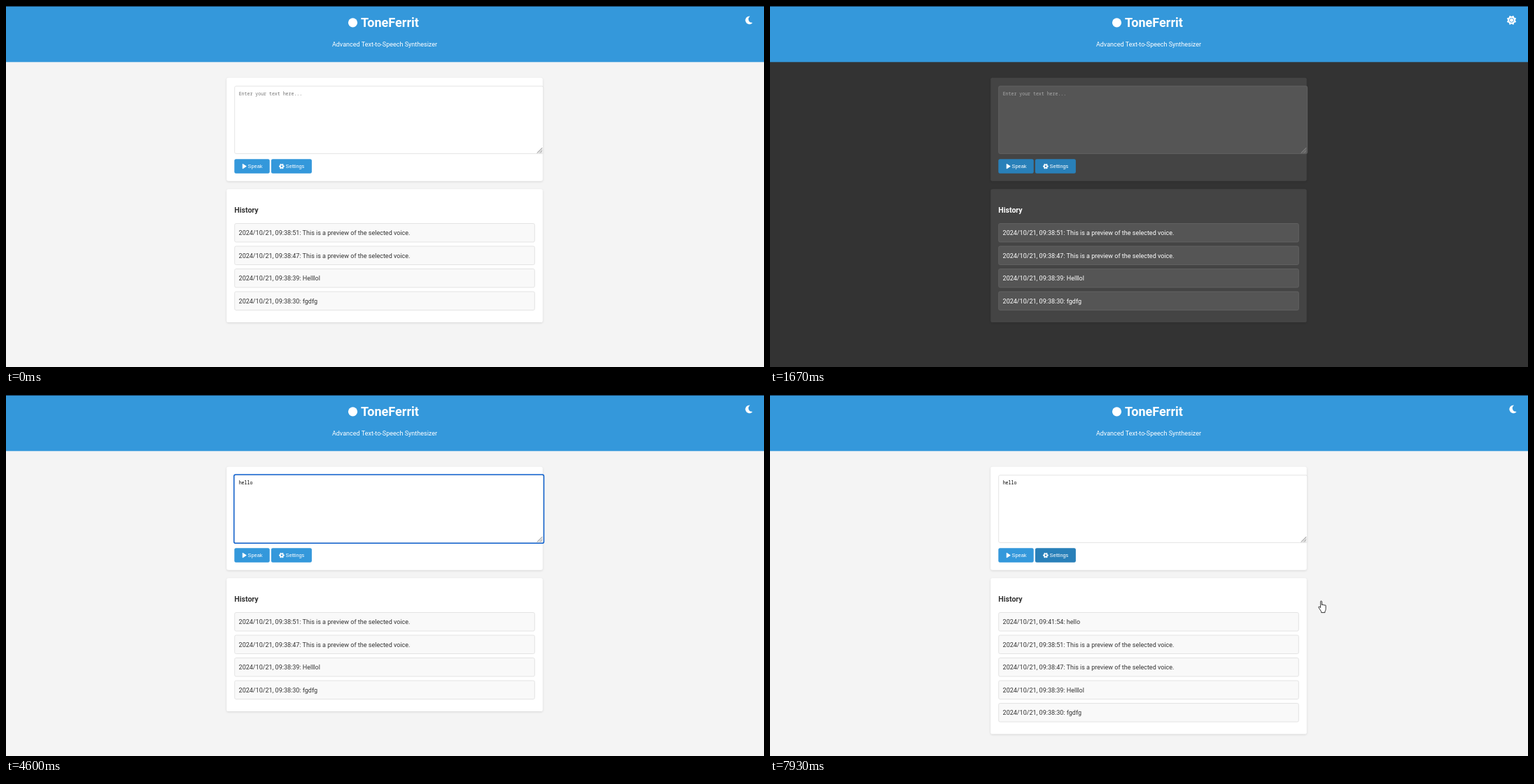
An HTML page that plays this animation: 1083 by 517 pixels, repeating every 8000 ms.

```html
<!DOCTYPE html>
<html lang="en">
<head>
<meta charset="utf-8">
<title>ToneFerrit</title>
<style>
html, body { margin: 0; width: 100%; height: 100%; overflow: hidden; }
svg {
  display: block; width: 100vw; height: 100vh;
  --page: #f4f4f4; --card: #fff; --field: #fff; --item: #f9f9f9; --line: #ddd;
  --text: #333; --typed: #000; --hint: #757575; --grip: #777;
  font-family: Roboto, sans-serif; font-size: 9.025px;
}
svg.dark {
  --page: #333; --card: #444; --field: #555; --item: #555; --line: #666;
  --text: #fff; --typed: #fff; --hint: #aaa; --grip: #999;
}
.page { fill: var(--page); }
.card { fill: var(--card); filter: drop-shadow(0 1.1px 1.4px rgba(0,0,0,.12)); }
.field { fill: var(--field); stroke: var(--line); stroke-width: .8; }
.item rect { fill: var(--item); stroke: var(--line); stroke-width: .8; }
.item text, .heading { fill: var(--text); }
.heading { font-size: 10.56px; font-weight: 700; }
.white { fill: #fff; }
.title { font-size: 18.05px; font-weight: 700; }
.label { fill: #fff; font: 7.4px "Liberation Sans", Arial, sans-serif; }
.mono { font: 6.57px "Noto Sans Mono", monospace; white-space: pre; }
.pointer { fill: #fff; stroke: #222; stroke-width: .9; stroke-linejoin: round; }
</style>
</head>
<body>
<svg id="stage" viewBox="0 0 1083 517" preserveAspectRatio="none">
  <rect class="page" width="1083" height="517"/>
  <rect width="1083" height="80.3" fill="#3498db"/>
  <rect width="1083" height=".9" fill="#16324a"/>
  <circle class="white" cx="495.5" cy="23.8" r="6.6"/>
  <text class="white title" x="507" y="30.4">ToneFerrit</text>
  <text class="white" x="541" y="58.2" text-anchor="middle">Advanced Text-to-Speech Synthesizer</text>

  <rect id="toggle" x="1044.6" y="6.2" width="32.8" height="27.8" rx="2.5" fill="#2980b9"/>
  <path id="moon" class="white" d="M1062.2 14.4a5.9 5.9 0 1 0 4.1 10.2q.3-.7-.4-.8a4.9 4.9 0 0 1-3.2-8.8q.4-.5-.5-.6z"/>
  <g id="sun">
    <path id="rays" class="white"/>
    <circle cx="1059.5" cy="20.3" r="3" fill="#fff" stroke="#3498db" stroke-width=".9"/>
  </g>

  <rect class="card" x="315.2" y="102.7" width="451.6" height="148" rx="2.6"/>
  <rect class="field" x="326.7" y="114.8" width="441" height="96.6" rx="2"/>
  <path d="M758.7 210.6l7.6-7.6M762.7 210.6l3.6-3.6" stroke="var(--grip)" stroke-width=".9"/>
  <path d="M760.7 210.6l5.6-5.6M764.7 210.6l1.6-1.6" stroke="var(--grip)" stroke-width=".5"/>
  <rect id="ring" x="325.7" y="113.9" width="442.8" height="98.4" rx="2.4" fill="none" stroke="#1062cf" stroke-width="1.5"/>
  <text id="hint" class="mono" x="332.7" y="127.9" fill="var(--hint)">Enter your text here...</text>
  <text id="typed" class="mono" x="332.7" y="127.9" fill="var(--typed)"></text>
  <rect id="caret" y="121.5" width=".7" height="8.4"/>

  <rect id="speak" x="326.3" y="219.3" width="50.4" height="20.5" rx="2.3"/>
  <path class="white" d="M338.2 226.3l5.1 3.3-5.1 3.3z" stroke="#fff" stroke-width=".9" stroke-linejoin="round"/>
  <text class="label" x="345.5" y="232.3">Speak</text>
  <rect id="settings" x="378.9" y="219.3" width="58" height="20.5" rx="2.3"/>
  <g fill="none" stroke="#fff">
    <circle cx="393.9" cy="229.6" r="2.1" stroke-width="1.7"/>
    <circle cx="393.9" cy="229.6" r="3.2" stroke-width="1.3" pathLength="12" stroke-dasharray="1.2 .8" stroke-dashoffset=".6"/>
  </g>
  <text class="label" x="399.6" y="232.3">Settings</text>

  <g id="spinner" fill="none" stroke-width="2.26">
    <circle cx="541" cy="267.6" r="10.15" stroke="#f8f8f8"/>
    <path d="M533.8 260.4a10.15 10.15 0 0 1 14.4 0" stroke="#3498db"/>
  </g>

  <g id="history">
    <rect id="panel" class="card" x="315.2" y="262.3" width="451.6" rx="2.6"/>
    <text class="heading" x="326.3" y="296.3">History</text>
    <g id="items"></g>
  </g>

  <g id="cursor">
    <path id="arrow" class="pointer" d="M0 0v11.2l2.6-2.4 2 4.3 1.8-.8-1.9-4.2h3.7z"/>
    <path id="hand" class="pointer" d="M-.9 9.6V1q0-1 .9-1t1 1v5q0-.9.9-.9t1 1q.1-.7.9-.7t1 1q.1-.6.9-.6t.9 1v4.6q0 2-1.2 3.6v1.6H.2v-1.4L-3.2 10q-.9-1.5 0-2 .8-.4 2.3 1.6z"/>
    <path id="beam" d="M-1.8-5h3.6M0-5V5M-1.8 5h3.6" stroke="#222" stroke-width=".8"/>
  </g>
</svg>
<script>
const LOOP = 8000, ROW = 32.52;
const $ = id => document.getElementById(id);
const show = (id, on) => $(id).setAttribute('display', on ? 'inline' : 'none');
const within = (v, a, b) => v >= a && v < b;
const ramp = (t, a, d) => Math.min(1, Math.max(0, (t - a) / d));
const pulse = (t, a, b, d) => ramp(t, a, d) - ramp(t, b, d);

const preview = 'This is a preview of the selected voice.';
const lines = [
  '09:41:54: hello', '09:38:51: ' + preview, '09:38:47: ' + preview,
  '09:38:39: Helllol', '09:38:30: fgdfg'
];
const keys = [[3930, 'h'], [4130, 'e'], [4270, 'l'], [4470, 'l'], [4530, 'o']];
// time, x, y
const route = [
  [2300, 1110, 128], [2700, 760, 230], [2870, 748, 232], [3000, 749, 204],
  [5130, 749, 204], [5500, 690, 296], [5930, 692, 298], [6200, 694, 330],
  [6470, 745, 300], [6600, 771, 312], [6670, 774.5, 336], [6800, 766, 371],
  [7150, 815, 440], [7500, 818, 380], [7670, 790, 330], [7930, 787.5, 295],
  [LOOP, 787.5, 295]
];

$('items').innerHTML = lines.map((line, i) => `<g class="item" id="item${i}">
  <rect x="326.7" y="311.5" width="428.6" height="26.5" rx="2"/>
  <text x="332.6" y="328.2">2024/10/21, ${line}</text></g>`).join('');

$('rays').setAttribute('d', 'M' + Array.from({ length: 16 }, (_, i) => {
  const r = i % 2 ? 5.3 : 7.2, a = (i + 1) * Math.PI / 8;
  return [1059.5 + r * Math.cos(a), 20.3 + r * Math.sin(a)].map(n => n.toFixed(2));
}).join('L') + 'z');

function blue(k) {
  const from = [52, 152, 219], to = [41, 128, 185];
  return `rgb(${from.map((c, i) => Math.round(c + (to[i] - c) * k))})`;
}

function moveCursor(t) {
  const visible = t >= route[0][0] && !within(t, 3930, 5180);
  show('cursor', visible);
  if (!visible) return;
  const i = Math.max(1, route.findIndex(p => p[0] > t));
  const [a, b] = [route[i - 1], route[i]];
  const k = (t - a[0]) / (b[0] - a[0]);
  const x = a[1] + (b[1] - a[1]) * k, y = a[2] + (b[2] - a[2]) * k;
  const overText = y < 232, overButton = within(y, 276, 313) && x < 838;
  $('cursor').setAttribute('transform', `translate(${x} ${y})`);
  show('beam', overText);
  show('hand', overButton);
  show('arrow', !overText && !overButton);
}

function draw(t) {
  const dark = within(t, 1400, 2000);
  $('stage').classList.toggle('dark', dark);
  show('sun', dark);
  show('moon', !dark);
  $('toggle').setAttribute('opacity', t < 1400 ? ramp(t, 1040, 90) : 1 - ramp(t, 1400, 240));

  const themed = pulse(t, 1400, 2000, 270);
  $('speak').setAttribute('fill', blue(themed + pulse(t, 5430, 6060, 270)));
  $('settings').setAttribute('fill', blue(themed + pulse(t, 6430, 6680, 130) + ramp(t, 7700, 200)));

  const typed = keys.filter(k => k[0] <= t).map(k => k[1]).join('');
  const focused = within(t, 2930, 5700);
  $('typed').textContent = typed;
  show('hint', !typed);
  show('ring', focused);
  show('caret', within(t, 3000, 3530) || within(t, 3930, 4600) || within(t, 5130, 5660));
  $('caret').setAttribute('x', 332.5 + typed.length * 3.942);

  const busy = within(t, 5795, 7300), done = t >= 7300;
  show('spinner', busy);
  $('spinner').setAttribute('transform', `rotate(${(t - 5795) * .36} 541 267.6)`);
  $('history').setAttribute('transform', `translate(0 ${busy ? 28.2 : 0})`);
  $('panel').setAttribute('height', 190.8 + (done ? ROW : 0));
  lines.forEach((_, i) => {
    const row = done ? i : i - 1;
    show('item' + i, row >= 0);
    $('item' + i).setAttribute('transform', `translate(0 ${row * ROW})`);
  });

  moveCursor(t);
}

const start = performance.now();
function tick() {
  draw((performance.now() - start) % LOOP);
  requestAnimationFrame(tick);
}
tick();
</script>
</body>
</html>
```
